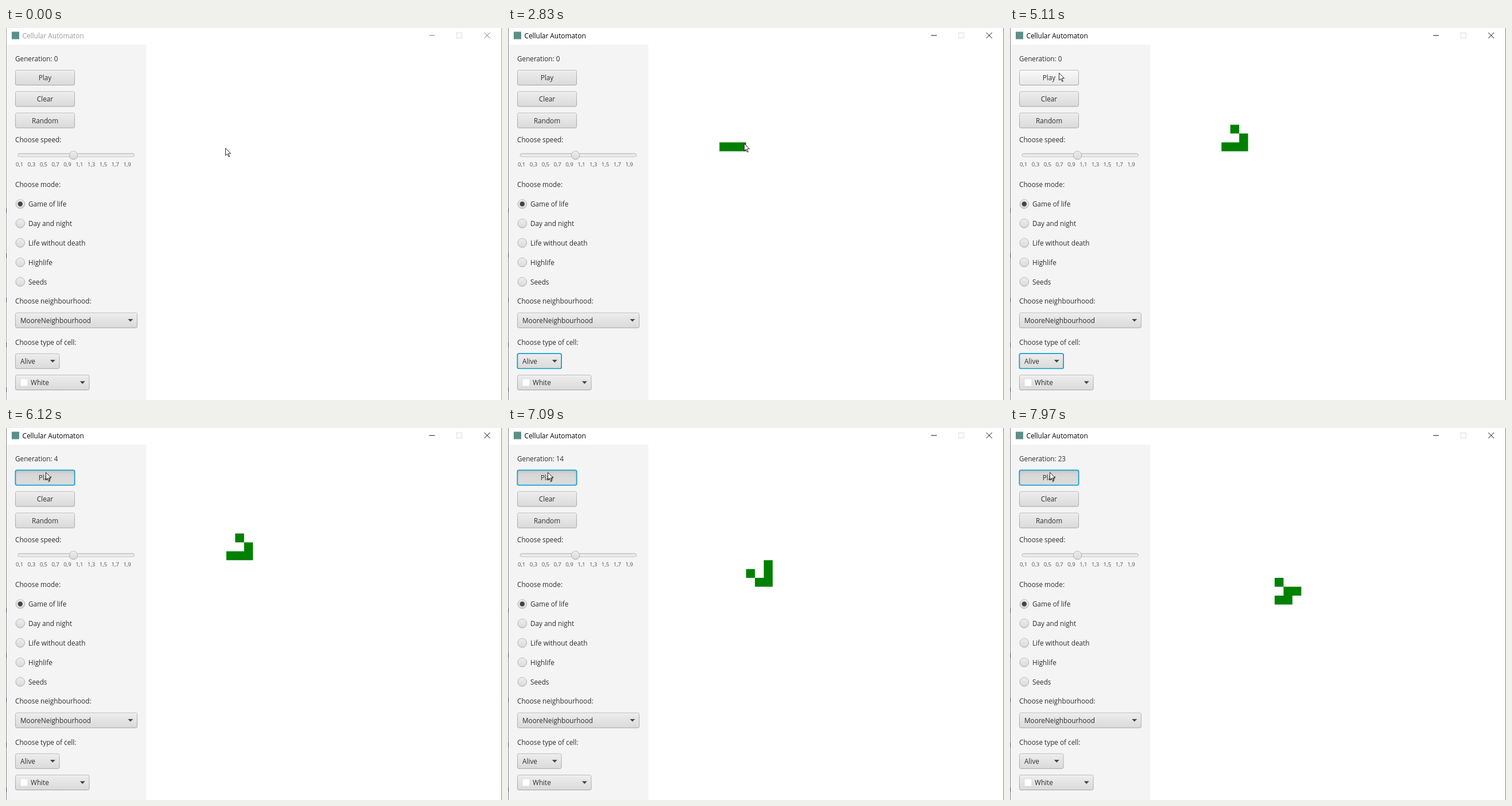
Animation of 864x648 px, one loop 8000 ms. Source, as an HTML page:

```html
<!DOCTYPE html>
<html lang="en">
<head>
<meta charset="utf-8">
<title>Cellular Automaton</title>
<style>
  html, body { margin: 0; width: 100%; height: 100%; overflow: hidden; background: #fff; }
  svg { display: block; width: 864px; height: 648px; }
  text { font: 11.75px "Open Sans", "Noto Sans", sans-serif; fill: #2e2e2e; }
  .tick { font-size: 9.6px; fill: #505050; text-anchor: middle; }
  .mid { text-anchor: middle; }
  .control { fill: url(#body); stroke: url(#edge); }
  .hover { fill: url(#light); }
  .armed { fill: #dadada; }
  .selected { fill: url(#sunken); }
  .focus { stroke: #159fd0; stroke-width: 1.6; filter: drop-shadow(0 0 .7px #039ed3); }
  #title { font-size: 11.85px; fill: #000; }
  #buttons { stroke: #111; fill: none; }
  #frame { fill: #858585; }
  .inactive #title { fill: #999; }
  .inactive #buttons { stroke: #777; }
  .inactive #frame { fill: #a4a4a4; }
</style>
</head>
<body>
<svg id="stage" viewBox="0 0 864 648">
  <defs>
    <linearGradient id="body" x2="0" y2="1">
      <stop stop-color="#f3f3f3"/><stop offset=".12" stop-color="#ebebeb"/>
      <stop offset="1" stop-color="#dadada"/>
    </linearGradient>
    <linearGradient id="light" x2="0" y2="1">
      <stop stop-color="#fafafa"/><stop offset="1" stop-color="#e6e6e6"/>
    </linearGradient>
    <linearGradient id="sunken" x2="0" y2="1">
      <stop stop-color="#c0c0c0"/><stop offset=".2" stop-color="#d3d3d3"/>
      <stop offset=".5" stop-color="#dadada"/>
    </linearGradient>
    <linearGradient id="edge" x2="0" y2="1">
      <stop stop-color="#bababa"/><stop offset="1" stop-color="#a6a6a6"/>
    </linearGradient>
    <linearGradient id="groove" x2="0" y2="1">
      <stop stop-color="#dcdcdc"/><stop offset="1" stop-color="#fbfbfb"/>
    </linearGradient>
  </defs>

  <rect width="864" height="648" fill="#fff"/>
  <rect x="1" y="29" width="243.5" height="619" fill="#f4f4f4"/>
  <path id="frame" d="M0 0h1v648h-1zM863 0h1v648h-1z"/>
  <path d="M.5 314V648" stroke="#3f4658" stroke-dasharray="8 70"/>

  <rect x="10" y="6.5" width="13" height="13" fill="#5c8f8a"/>
  <text id="title" x="28.5" y="18">Cellular Automaton</text>
  <g id="buttons">
    <path d="M737 13h10M833.2 8l10 10m0-10l-10 10"/>
    <rect x="785" y="8.5" width="9" height="9" stroke="#dcdcdc"/>
  </g>

  <text id="counter" x="16" y="58"></text>
  <g id="panel"></g>
  <path id="cells" fill="#008000"/>
  <path id="cursor" d="M.5 .3V13L3.4 10.3 5.5 15H7.4L5.4 9.7H9.5Z" fill="#fff" stroke="#111" stroke-width=".9"/>
</svg>

<script>
const LOOP = 8000, CELL = 15.45, LEFT = 244.75, TOP = 29.35;
const ACTIVE = 740, HOVER = 5110, PRESS = 5520, RELEASE = 5730;
const RUN = 5910, PERIOD = 97.5;
const el = id => document.getElementById(id);

// Side panel
const label = (x, y, str, cls = "") => `<text x="${x}" y="${y}" class="${cls}">${str}</text>`;
const box = (y, w, id = "") =>
  `<rect id="${id}" class="control" x="16.5" y="${y + .5}" width="${w}" height="26" rx="2.5"/>`;
const button = (str, i) => {
  const y = 73 + i * 37.25;
  return box(y, 103, str.toLowerCase()) + label(68, y + 18, str, "mid");
};
const combo = (y, w, str, id, x = 25) => box(y, w, id) + label(x, y + 18, str) +
  `<path d="M${w + .3} ${y + 11.2}h9l-4.5 4.7z" fill="#444"/>`;
const radio = (str, i) => {
  const y = 306.5 + i * 33.9;
  const dot = i ? "" : `<circle cx="24.8" cy="${y}" r="4.2" fill="#444"/>`;
  return `<circle class="control" cx="24.8" cy="${y}" r="7.8"/>${dot}` + label(39, y + 4.5, str);
};
const tick = i => label(23.7 + i * 20.83, 241.3, (0.1 + i * 0.2).toFixed(1).replace(".", ","), "tick");

el("panel").innerHTML =
  ["Play", "Clear", "Random"].map(button).join("") +
  label(16, 198.5, "Choose speed:") +
  `<rect x="21" y="218.7" width="202.5" height="5.4" rx="2.7" fill="url(#groove)" stroke="#b8b8b8"/>
   <circle class="control" cx="117.5" cy="221.7" r="7.3"/>` +
  Array.from({ length: 10 }, (_, i) => tick(i)).join("") +
  label(16, 277, "Choose mode:") +
  ["Game of life", "Day and night", "Life without death", "Highlife", "Seeds"].map(radio).join("") +
  label(16, 480.3, "Choose neighbourhood:") + combo(495.7, 212, "MooreNeighbourhood") +
  label(16, 551.5, "Choose type of cell:") + combo(566.8, 76.5, "Alive", "alive") +
  combo(604, 128.5, "White", "", 43) +
  `<rect x="25" y="611" width="13" height="13" fill="#fff" stroke="#d2d2d2" stroke-width=".7"/>`;

// Cells drawn by hand, one per click
const glider = [[8, 11], [9, 11], [10, 11], [10, 10], [9, 9]];
const clicks = [950, 1860, 2620, 3810, 4660];

function nextGen(cells) {
  const alive = new Set(cells.map(String)), count = {};
  for (const [x, y] of cells)
    for (let dx = -1; dx < 2; dx++)
      for (let dy = -1; dy < 2; dy++)
        if (dx || dy) {
          const key = `${x + dx},${y + dy}`;
          count[key] = (count[key] || 0) + 1;
        }
  return Object.keys(count)
    .filter(k => count[k] === 3 || (count[k] === 2 && alive.has(k)))
    .map(k => k.split(",").map(Number));
}

// The first generation passes unseen, so the count starts at two
const genAt = t => t < RUN ? 0 : 2 + Math.floor((t - RUN) / PERIOD);
const gens = [glider];
while (gens.length <= genAt(LOOP)) gens.push(nextGen(gens.at(-1)));

// Pointer strokes: start, end, x, y
const strokes = [
  [1130, 1430, 389.5, 205],
  [1930, 2200, 411, 205],
  [2800, 2980, 410, 184],
  [3310, 3370, 410, 189],
  [4050, 4250, 386, 175],
  [4940, HOVER, 85, 78],
  [HOVER, 5270, 69, 77]
];

function pointerAt(t) {
  let x = 382, y = 209;
  for (const [from, to, toX, toY] of strokes) {
    const p = Math.min(1, Math.max(0, (t - from) / (to - from)));
    x += (toX - x) * p;
    y += (toY - y) * p;
  }
  return [x, y];
}

function playClass(t) {
  if (t >= RELEASE) return "control selected focus";
  if (t >= PRESS) return "control armed focus";
  return t >= HOVER ? "control hover" : "control";
}

function render(t) {
  const gen = genAt(t);
  const cells = gens[gen].filter((_, i) => gen || clicks[i] <= t);
  const [x, y] = pointerAt(t);

  el("stage").setAttribute("class", t < ACTIVE ? "inactive" : "");
  el("counter").textContent = `Generation: ${gen}`;
  el("play").setAttribute("class", playClass(t));
  el("alive").setAttribute("class", t >= ACTIVE && t < PRESS ? "control focus" : "control");
  el("cells").setAttribute("d", cells.map(([c, r]) =>
    `M${LEFT + c * CELL} ${TOP + r * CELL}h${CELL}v${CELL}h${-CELL}z`).join(""));
  el("cursor").setAttribute("transform", `translate(${Math.round(x)} ${Math.round(y)})`);
}

const start = performance.now();
function frame() {
  render((performance.now() - start) % LOOP);
  requestAnimationFrame(frame);
}
frame();
</script>
</body>
</html>
```
